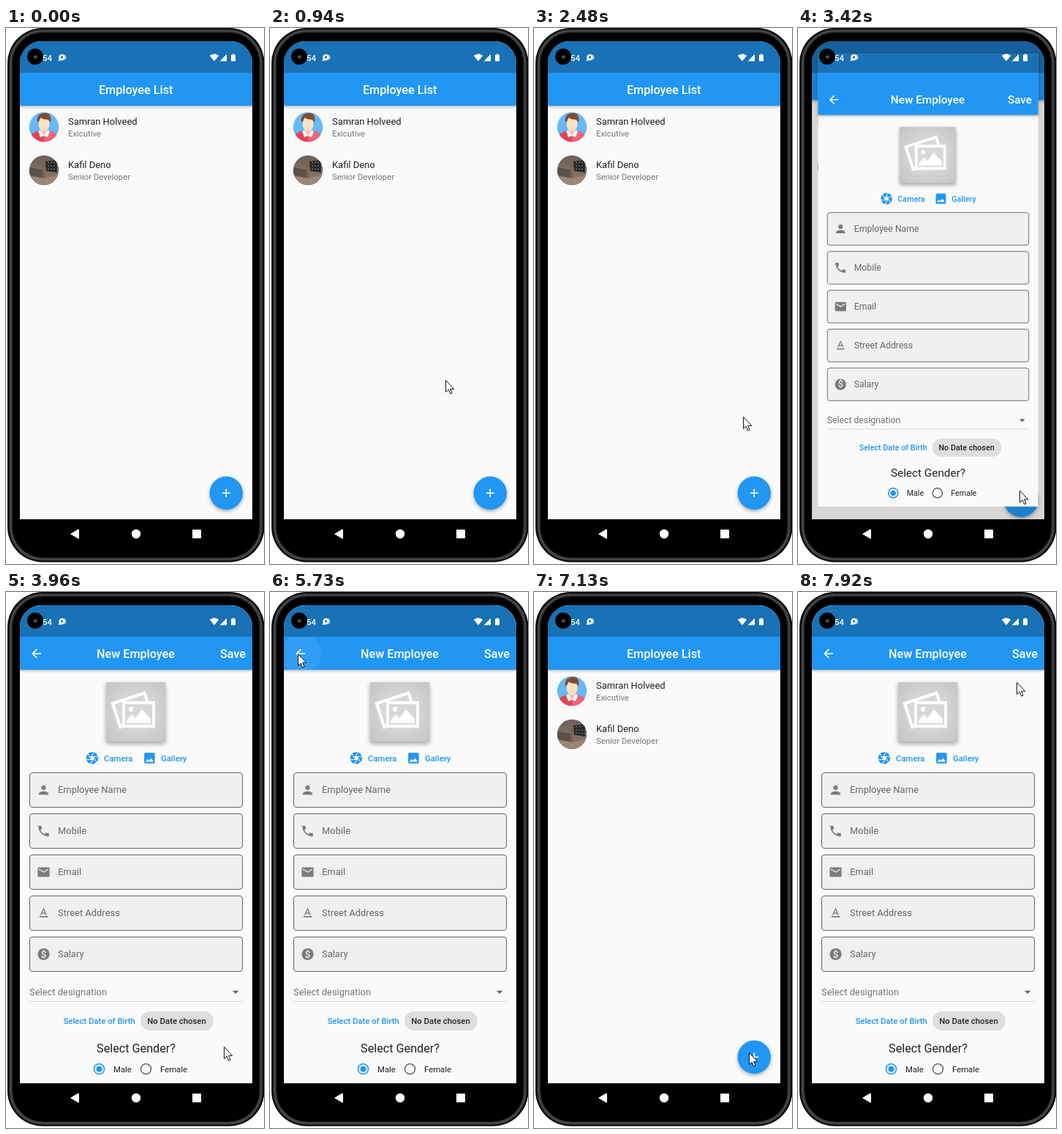
An HTML page that plays this animation: 353x731 px, repeating every 8000 ms.

```html
<!DOCTYPE html>
<html lang="en">
<head>
<meta charset="utf-8">
<title>Employee List</title>
<style>
  html, body { margin: 0; width: 100%; height: 100%; overflow: hidden; background: #fff; }
  svg { display: block; width: 100%; height: 100%; }
  text { font: 400 12.95px Roboto, sans-serif; fill: #212121; }
  .title { font-size: 16.2px; font-weight: 500; fill: #fff; }
  .mid { text-anchor: middle; }
  .small { font-size: 11.34px; }
  .grey { fill: #757575; }
  .label { fill: #666; }
  .medium { font-weight: 500; }
  .blue { fill: #2196f3; }
  .bar { fill: #2196f3; filter: drop-shadow(0 1.5px 2px rgba(0, 0, 0, .36)); }
  .fab { fill: #2196f3; filter: drop-shadow(0 2.5px 2.5px rgba(0, 0, 0, .33)); }
  .card { filter: drop-shadow(0 3px 3px rgba(0, 0, 0, .35)); }
  .rim { fill: none; stroke: #5a5a5a; stroke-width: 3; filter: blur(1px); }
</style>
</head>
<body>
<svg viewBox="0 0 353 731">
  <defs>
    <clipPath id="screen"><path d="M19 670V48A30 30 0 0 1 49 18H307A30 30 0 0 1 337 48V670Z"/></clipPath>
    <clipPath id="body"><rect x="19" y="106" width="318" height="564"/></clipPath>
    <clipPath id="appbar"><rect x="19" y="61" width="318" height="45"/></clipPath>
    <clipPath id="round"><circle r="20.2"/></clipPath>
    <radialGradient id="paper" r=".7"><stop stop-color="#e2e2e2"/><stop offset="1" stop-color="#c4c4c4"/></radialGradient>
    <linearGradient id="desk" x2="0" y2="1"><stop stop-color="#6a5e57"/><stop offset=".45" stop-color="#7d6e63"/><stop offset="1" stop-color="#8b7a6c"/></linearGradient>
    <g id="bars">
      <rect x="19" y="18" width="318" height="652" fill="#fafafa"/>
      <rect class="bar" x="19" y="18" width="318" height="88"/>
    </g>
    <path id="image" d="M21 19V5c0-1.1-.9-2-2-2H5c-1.1 0-2 .9-2 2v14c0 1.1.9 2 2 2h14c1.1 0 2-.9 2-2zM8.5 13.5l2.5 3.01L14.5 12l4.5 6H5l3.5-4.5z"/>
    <path id="person" d="M12 12c2.21 0 4-1.79 4-4s-1.79-4-4-4-4 1.79-4 4 1.79 4 4 4zm0 2c-2.67 0-8 1.34-8 4v2h16v-2c0-2.66-5.33-4-8-4z"/>
    <path id="phone" d="M6.62 10.79c1.44 2.83 3.76 5.14 6.59 6.59l2.2-2.2c.27-.27.67-.36 1.02-.24 1.12.37 2.33.57 3.57.57.55 0 1 .45 1 1V20c0 .55-.45 1-1 1-9.39 0-17-7.61-17-17 0-.55.45-1 1-1h3.5c.55 0 1 .45 1 1 0 1.25.2 2.45.57 3.57.11.35.03.74-.25 1.02z"/>
    <path id="mail" d="M20 4H4c-1.1 0-2 .9-2 2v12c0 1.1.9 2 2 2h16c1.1 0 2-.9 2-2V6c0-1.1-.9-2-2-2zm0 4l-8 5-8-5V6l8 5 8-5z"/>
    <path id="format" d="M5 17v2h14v-2zm4.5-4.2h5l.9 2.2h2.1L12.75 4h-1.5L6.5 15h2.1zM12 5.98L13.87 11h-3.74z"/>
    <g id="coin"><circle cx="12" cy="12" r="10"/><text class="mid medium" x="12" y="17.8" style="font-size:16.5px;fill:#f0f0f0">$</text></g>
  </defs>

  <rect x="2" y="0" width="351.5" height="728.5" rx="48"/>
  <rect class="rim" x="6.500" y="4" width="342.500" height="720.500" rx="44"/>

  <g clip-path="url(#screen)">
    <g id="list">
      <use href="#bars"/>
      <text class="title mid" x="177.700" y="90">Employee List</text>
      <g transform="translate(52 135)" clip-path="url(#round)">
        <circle r="21" fill="#64b9f6"/>
        <path d="M-20 21V14Q-16 7-6 5H6Q16 7 20 14V21Z" fill="#e8425a"/>
        <path d="M0 8L6 5Q16 7 20 14V21H0Z" fill="#f0647a"/>
        <path d="M-4 2H4V7L0 13L-4 7Z" fill="#f3c29c"/>
        <path d="M-5 4L0 12L-5 14L-8 6ZM5 4L0 12L5 14L8 6Z" fill="#eef3f8"/>
        <ellipse cy="-4" rx="7.500" ry="10" fill="#fde0c2"/>
        <path d="M-9-6Q-11-18 0-19Q11-20 9-6L6-10Q-2-10-5-13Q-6-8-9-6Z" fill="#85492f"/>
      </g>
      <text x="85" y="132.200">Samran Holveed</text>
      <text class="small grey" x="85" y="148.200">Exicutive</text>
      <g transform="translate(52 194)" clip-path="url(#round)">
        <circle r="21" fill="url(#desk)"/>
        <path d="M-21-4L-2-1V10L-21 7Z" fill="#5d5048"/>
        <path d="M-21 8L0 11L21 6V21H-21Z" fill="#998676"/>
        <path d="M2-12L18-14V3L3 1Z" fill="#2a2a2c"/>
        <path d="M5-10L17-11M5-6H18M5-2L18-1" stroke="#88847f" stroke-dasharray="2 2"/>
        <path d="M0-15V11" stroke="#80614b" stroke-width="3"/>
      </g>
      <text x="85" y="190.700">Kafil Deno</text>
      <text class="small grey" x="85" y="206.700">Senior Developer</text>
      <g clip-path="url(#body)"><ellipse id="glow" cx="205" rx="477" fill="#2196f3"/></g>
      <circle class="fab" cx="301.300" cy="634.300" r="22.700"/>
      <path d="M295.600 634.300H307M301.300 628.600V640" stroke="#fff" stroke-width="1.600"/>
    </g>

    <rect id="scrim" x="19" y="18" width="318" height="652"/>

    <g id="form">
      <use href="#bars"/>
      <g clip-path="url(#appbar)"><circle id="ripple" cx="43" cy="84" fill="#fff" opacity=".07"/></g>
      <path d="M20 11H7.830l5.590-5.590L12 4l-8 8 8 8 1.410-1.410L7.830 13H20z" transform="translate(32 74.300) scale(.81)" fill="#fff"/>
      <text class="title mid" x="177.500" y="90">New Employee</text>
      <text class="title" x="293" y="90">Save</text>

      <rect class="card" x="137" y="123" width="81" height="81" fill="url(#paper)"/>
      <g fill="#d8d8d8" stroke="#fff" stroke-width="4">
        <rect x="-23" y="-17" width="46" height="34" transform="translate(173 161) rotate(-18)"/>
        <rect x="161" y="151" width="41" height="32"/>
      </g>
      <path d="M165 179V175L172 167L177 172L186 160L198 173V179Z" fill="#fff"/>
      <circle cx="171" cy="160" r="3.200" fill="#fff"/>

      <g id="aperture" transform="translate(118 226.500) scale(.82)"><circle class="blue" r="10"/></g>
      <text class="small medium blue" x="134" y="230.700">Camera</text>
      <use class="blue" href="#image" transform="translate(186.700 216.800) scale(.81)"/>
      <text class="small medium blue" x="212" y="230.700">Gallery</text>

      <g id="fields"></g>

      <text class="grey" x="32" y="550.300">Select designation</text>
      <path d="M309.800 543.800H318.200L314 548Z" fill="#616161"/>
      <path d="M32 558.500H324" stroke="#dcdcdc"/>
      <text class="small medium blue" x="78.500" y="589">Select Date of Birth</text>
      <rect x="184" y="572" width="100" height="26" rx="13" fill="#dedede"/>
      <text class="small medium mid" x="233.500" y="589">No Date chosen</text>
      <text class="mid" x="178" y="627.500" style="font-size:16.2px">Select Gender?</text>
      <g fill="none" stroke-width="1.600">
        <circle cx="127.500" cy="650.500" r="7" stroke="#2196f3"/>
        <circle cx="191.500" cy="650.500" r="7" stroke="#666"/>
      </g>
      <circle class="blue" cx="127.500" cy="650.500" r="4"/>
      <text class="small" x="147" y="654.700">Male</text>
      <text class="small" x="211" y="654.700">Female</text>
    </g>

    <rect x="19" y="18" width="318" height="43" opacity=".25"/>
  </g>

  <g fill="#fff">
    <text x="50" y="45" class="small medium" style="fill:#fff">54</text>
    <circle cx="76.500" cy="40" r="4.200"/>
    <path d="M71.500 45L73 41L77 44Z"/>
    <path d="M80.500 36.500Q83 40 80.500 43.500" fill="none" stroke="#fff"/>
    <circle cx="76.500" cy="40" r="1.700" fill="#1971b6"/>
    <path d="M278.800 37.800Q285 32.800 291.200 37.800L285 45.300Z"/>
    <path d="M292.500 45.300H302V35.800Z"/>
    <path d="M308 36.500H309.700V35.500H312.300V36.500H314V45.300H308Z"/>
    <path d="M89.500 690L99 684.500V695.500Z" stroke="#fff" stroke-width="2" stroke-linejoin="round"/>
    <circle cx="178" cy="690" r="6.200"/>
    <rect x="255" y="684" width="12" height="12" rx="1"/>
  </g>
  <circle cx="40" cy="39" r="11"/>
  <circle cx="40.500" cy="39.500" r="2.600" fill="#3b3b3b"/>
  <circle cx="40" cy="39" r=".9" fill="#888"/>

  <g id="pointer">
    <circle id="press" r="12" fill="#fff550" fill-opacity=".78"/>
    <path d="M.5.5V16.500L4.200 13.200L6.700 19L9 18L6.600 12.300H11.700Z" fill="#fff" stroke="#111"/>
  </g>
</svg>
<script>
  const $ = id => document.getElementById(id);
  const LOOP = 8000, TICK = 77.3, FIRST = 156;   // the screen is sampled about 13 times a second
  const PAGE_TICKS = 300 / TICK;
  const clamp = v => Math.min(1, Math.max(0, v));
  const span = (p, a, b) => clamp((p - a) / (b - a));

  $('fields').innerHTML = [
    ['person', 'Employee Name'], ['phone', 'Mobile'], ['mail', 'Email'],
    ['format', 'Street Address'], ['coin', 'Salary']
  ].map(([icon, label], i) => `<g transform="translate(0 ${i * 56})">
    <rect x="32.5" y="246.5" width="291" height="47" rx="3.5" fill="#f0f0f0" stroke="#666"/>
    <use href="#${icon}" fill="#7b7b7b" transform="translate(41.8 260.3) scale(.81)"/>
    <text class="label" x="71" y="274.3">${label}</text></g>`).join('');

  $('aperture').innerHTML += '<circle r="2.9" fill="#fafafa"/>' + [0, 1, 2, 3, 4, 5].map(i =>
    `<path d="M-1.5-2.5H9.7" stroke="#fafafa" stroke-width="1.2" transform="rotate(${i * 60})"/>`).join('');

  // Keys are [tick, ...values], joined by straight lines.
  function track(keys, n) {
    const i = keys.findIndex(k => k[0] > n);
    if (i === 0) return keys[0].slice(1);
    if (i < 0) return keys[keys.length - 1].slice(1);
    const [a, b] = [keys[i - 1], keys[i]];
    const f = (n - a[0]) / (b[0] - a[0]);
    return a.slice(1).map((v, j) => v + (b[j + 1] - v) * f);
  }

  function bezier(x, x1, y1, x2, y2) {
    const curve = (u, a, b) => 3 * u * (1 - u) ** 2 * a + 3 * u * u * (1 - u) * b + u ** 3;
    let lo = 0, hi = 1;
    for (let i = 0; i < 24; i++) {
      const u = (lo + hi) / 2;
      if (curve(u, x1, x2) < x) lo = u; else hi = u;
    }
    return curve(lo, y1, y2);
  }

  // Fast out, extra slow in
  const zoomEase = p => p < 1 / 6
    ? 0.4 * bezier(p * 6, 0.05, 0, 0.1333, 0.06)
    : 0.4 + 0.6 * bezier((p - 1 / 6) * 1.2, 0.2083, 0.82, 0.25, 1);

  const path = [
    [0, 322, 716], [3, 332, 650], [6, 296, 560], [10, 240, 480], [19, 240, 480],
    [20, 247, 425], [21, 255, 345], [22, 259, 299], [25, 252, 301], [29, 229, 303],
    [30, 286, 530], [31, 329, 653], [32, 329, 653], [34, 336, 658], [37, 303, 631],
    [48, 303, 630], [49, 298, 620], [52, 245, 430], [56, 158, 175], [59, 125, 95],
    [61, 85, 92], [63, 38, 84], [75, 38, 84], [78, 150, 190], [81, 256, 285],
    [84, 280, 430], [87, 304, 590], [89, 296, 626], [90, 294, 628], [92, 298, 631],
    [96, 298, 631], [98, 338, 400], [100, 299, 123]
  ];
  const glowKeys = [[19, 0, 0], [20, 0.3, 0.05], [22, 0.78, 0.1], [24, 0.76, 0.1], [27, 0.35, 0.045], [29, 0, 0]];
  const presses = [[19, 25], [39, 41], [69, 71], [93, 95]];
  const opens = [41, 95], closeAt = 72;

  function zoom(id, scale, opacity = 1) {
    $(id).setAttribute('transform', `translate(178 344) scale(${scale}) translate(-178 -344)`);
    $(id).setAttribute('opacity', opacity);
  }

  function drawPages(n) {
    let scrim = 0;
    if (n >= closeAt && n < opens[1]) {
      const p = clamp((n - closeAt) / PAGE_TICKS), e = zoomEase(p);
      zoom('list', p ? 1.1 - 0.1 * e : 1);
      zoom('form', 1 - 0.1 * e, 1 - span(p, 0.0825, 0.2075));
    } else {
      const p = clamp((n - opens[n < closeAt ? 0 : 1]) / PAGE_TICKS), e = zoomEase(p);
      zoom('list', 1 + 0.05 * e);
      zoom('form', 0.85 + 0.15 * e, span(p, 0.125, 0.25));
      scrim = 0.6 * span(p, 0.2075, 0.4175);
    }
    $('scrim').setAttribute('opacity', scrim);
  }

  function draw(t) {
    const n = Math.floor((t - FIRST) / TICK);
    drawPages(n);

    const [size, alpha] = track(glowKeys, n);
    $('glow').setAttribute('ry', 477 * size);
    $('glow').setAttribute('cy', 670 + (477 - 64) * size);
    $('glow').setAttribute('opacity', alpha);

    $('ripple').setAttribute('r', n >= 71 && n < 77 ? Math.min(27, 20 + (n - 71) * 7) : 0);

    const [x, y] = track(path, n);
    $('pointer').setAttribute('transform', `translate(${x} ${y})`);
    $('pointer').setAttribute('visibility', n < 0 ? 'hidden' : 'visible');
    $('press').setAttribute('opacity', presses.some(([a, b]) => n >= a && n < b) ? 1 : 0);
  }

  const start = performance.now();
  function frame() {
    draw((performance.now() - start) % LOOP);
    requestAnimationFrame(frame);
  }
  frame();
</script>
</body>
</html>
```
